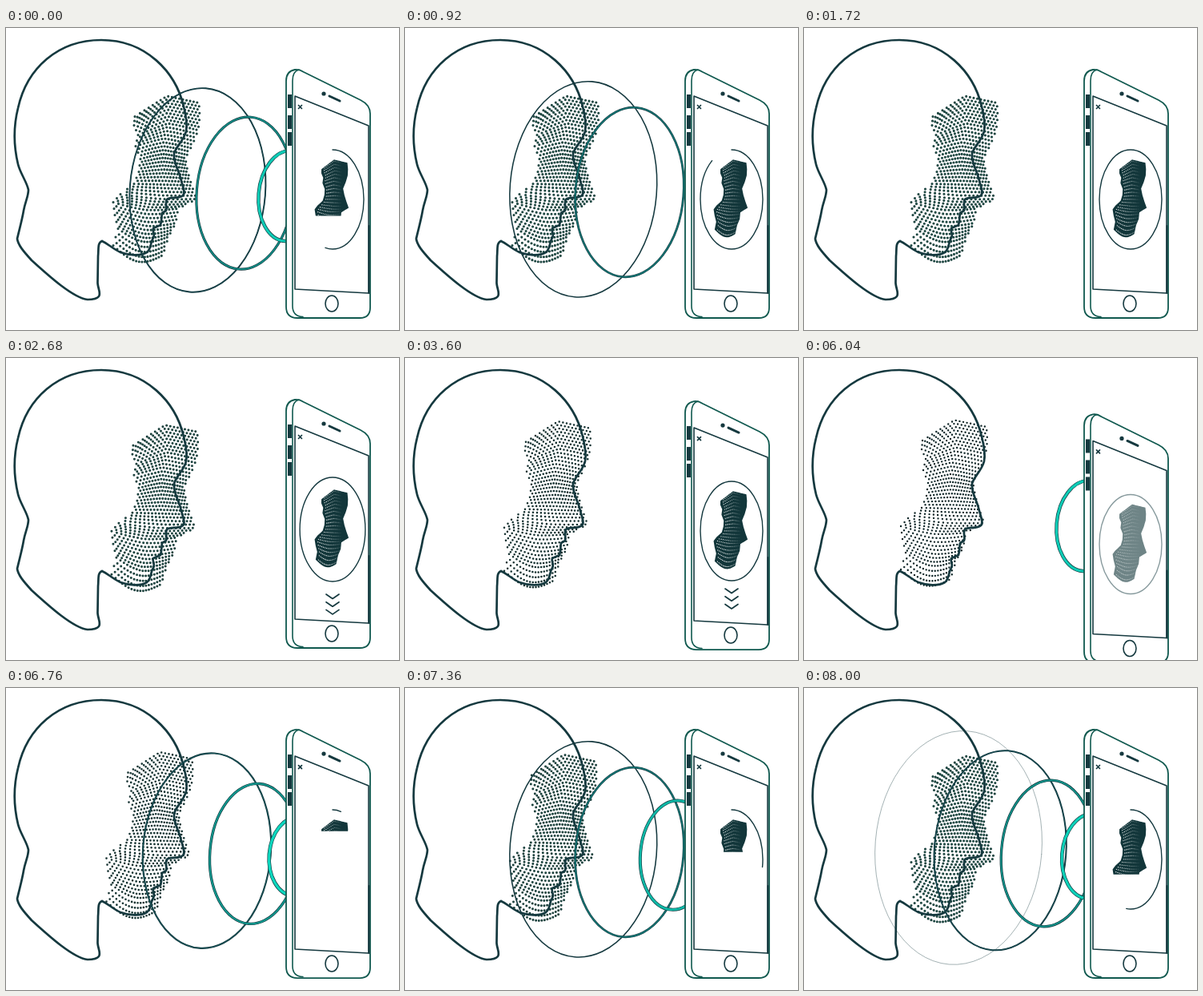
Recreate the animation shown at these times as an HTML page with a canvas. Size 491 by 377 pixels, loop 8040 ms.

```html
<!DOCTYPE html>
<html lang="en">
<head>
<meta charset="utf-8">
<title>Face scan</title>
<style>
html, body { margin: 0; width: 100%; height: 100%; overflow: hidden; background: #fff; }
canvas { display: block; }
</style>
</head>
<body>
<canvas id="stage" width="491" height="377"></canvas>
<script>
const LOOP = 8040;
const DARK = '#15393f', TEAL = '#10594f';
const ctx = document.getElementById('stage').getContext('2d');

const clamp = x => Math.max(0, Math.min(1, x));
const lerp = (a, b, k) => a + (b - a) * k;
const ease = (t, from, to) => (1 - Math.cos(Math.PI * clamp((t - from) / (to - from)))) / 2;
const mix = (a, b, k) => `rgb(${a.map((v, i) => Math.round(lerp(v, b[i], k)))})`;

function stroke(path, color, width) {
  ctx.strokeStyle = color;
  ctx.lineWidth = width;
  ctx.stroke(path);
}

function addDot(path, [x, y]) {
  path.moveTo(x, y);
  path.lineTo(x + .01, y);
}

const head = new Path2D(`M120 266 C114 268 116 276 115 285 L114.5 317 C114 323 119 331 116 335
  C113 339 107 339 102 339 C84 337 54 310 32 290 C22 279 15 271 14 263
  C17 250 20 240 22 228 C24 217 28 210 28 202 C26 192 18 182 15 170
  C9 145 10 120 15 100 C26 50 65 15 119 15 C175 15 212 55 222 98
  C225 110 227 120 225 129 C222 141 212 148 210 157 C209 168 215 176 218 187
  C220 196 225 206 221 209 C216 214 205 210 201 214 C198 219 202 224 200 228
  L195 231 C194 235 195 240 193 246 L184 250 C182 254 187 257 184 262
  C180 268 182 275 176 280 C168 285 154 284 143 280 C134 276 127 269 120 266`);

// Left and right edges of the face mesh, evenly spaced from brow to chin.
const LEFT = [[148,103],[147,114],[152,126],[149,140],[155,156],[153,172],
  [147,187],[130,200],[121,210],[123,226],[127,243],[121,264]];
const RIGHT = [[228,86],[229,103],[227,120],[220,138],[211,155],[214,172],
  [219,189],[225,206],[202,218],[199,236],[190,253],[183,276]];

function along(edge, v) {
  const p = v * (edge.length - 1), i = Math.min(edge.length - 2, Math.floor(p));
  return [0, 1].map(k => lerp(edge[i][k], edge[i + 1][k], p - i));
}

// Rows peak sharply at the forehead and sag smoothly at the chin.
function meshPoint(u, v) {
  const a = along(LEFT, v), b = along(RIGHT, v);
  const bend = lerp(1 - Math.abs(2 * u - 1), Math.sin(Math.PI * u), v);
  return [lerp(a[0], b[0], u), lerp(a[1], b[1], u) + lerp(-17, 14, v) * bend];
}

const toScreen = ([x, y]) => {
  const fy = (y - 77) / 211;
  return [387 + (x - 120) * .41 - 5 * (1 - fy), 164 + fy * 99];
};

const ROWS = 45, COLS = 17;
const cloud = new Path2D(), specks = new Path2D(), miniShape = new Path2D();
for (let r = 0; r < ROWS; r++)
  for (let c = 0; c < COLS; c++) {
    const u = (c + (r % 2) / 2) / (COLS - .5);
    const p = meshPoint(u ** .9, r / (ROWS - 1));
    addDot(cloud, p);
    if (c && r % 2) addDot(specks, toScreen(p));
  }

for (let i = 0; i <= 20; i++) miniShape.lineTo(...toScreen(meshPoint(i / 20, 0)));
for (let i = 0; i <= 44; i++) miniShape.lineTo(...toScreen(meshPoint(1, i / 44)));
for (let i = 20; i >= 0; i--) miniShape.lineTo(...toScreen(meshPoint(i / 20, 1)));
for (let i = 44; i >= 0; i--) miniShape.lineTo(...toScreen(meshPoint(0, i / 44)));

const gaps = ctx.createLinearGradient(388, 0, 420, 0);
gaps.addColorStop(0, '#fff');
gaps.addColorStop(.4, 'rgba(255,255,255,.8)');
gaps.addColorStop(1, 'rgba(255,255,255,0)');

const body = new Path2D('M350 66 Q350 54 361 52 Q366 51 372 55 L443 90 Q455 96 455 107 V349 Q455 362 442 362 H364 Q350 362 350 348Z');
const front = new Path2D('M366 52 Q358 54 358 66 V347 Q358 360 371 360.5');
const glass = new Path2D('M361 85 L453 122 V331 L361 326Z');
const details = new Path2D('M365.5 96.5 l4 4 m0 -4 l-4 4');

function drawWave(age) {
  const left = 209 - 182 * Math.sin(.00116 * (age - 700));
  const u = left - 213;
  const rx = 67.5 - .295 * u, ry = 106 - .41 * u - .0007 * u * u;
  const ring = new Path2D();
  ring.ellipse(left + rx, 205 + .045 * u, rx, ry, .08, 0, 7);
  const width = 4.9 - .0031 * age;
  ctx.globalAlpha = clamp((1360 - age) / 80);
  stroke(ring, DARK, width);
  if (width > 1.9)
    stroke(ring, mix([12, 228, 200], [22, 70, 79], clamp(age / 1000)), width - 1.3);
  ctx.globalAlpha = 1;
}

function drawMiniFace(limit, alpha) {
  ctx.save();
  ctx.globalAlpha = alpha;
  ctx.beginPath();
  ctx.rect(361, 150, 92, limit - 150);
  ctx.clip();
  ctx.fillStyle = '#12363a';
  ctx.fill(miniShape);
  stroke(specks, gaps, 1.3);
  ctx.restore();
}

function drawPhone(t, T) {
  ctx.save();
  ctx.translate(0, 34 * (ease(t, 3270, 5370) - ease(t, 5370, 6790)));
  ctx.fillStyle = '#fff';
  ctx.fill(body);
  stroke(body, TEAL, 1.8);
  stroke(front, TEAL, 1.6);
  stroke(glass, DARK, 1.6);
  stroke(details, DARK, 1.7);

  ctx.fillStyle = DARK;
  for (const y of [83, 109, 130]) ctx.fillRect(352, y, 5, 17);
  ctx.beginPath();
  ctx.arc(397, 82, 2.6, 0, 7);
  ctx.fill();
  stroke(new Path2D('M404 85 L417 91'), DARK, 3);
  stroke(new Path2D('M453.5 247 V331'), DARK, 2);
  const home = new Path2D();
  home.ellipse(407, 344, 8, 10, 0, 0, 7);
  stroke(home, DARK, 1.6);

  // Previous scan fades while the next one is drawn.
  const scanned = t >= 2500;
  if (scanned) drawMiniFace(270, 1 - clamp((t - 5600) / 1140));
  if (T > 6400) drawMiniFace(Math.min(270, 163 + (T - 6400) * .0435), 1);

  const grow = 1 + .05 * (ease(t, 1900, 2600) - ease(t, 2600, 3400));
  const oval = turn => {
    const p = new Path2D();
    p.ellipse(408, 214, 39 * grow, 62 * grow, 0, -Math.PI / 2, -Math.PI / 2 + turn * 2 * Math.PI);
    stroke(p, DARK, 1.4);
  };
  if (scanned && t < 6500) {
    ctx.globalAlpha = 1 - clamp((t - 5600) / 900);
    oval(1);
    ctx.globalAlpha = 1;
  }
  if (T > 6650) oval(clamp((T - 6650) * .139 / 360));

  const hint = Math.min(clamp((t - 2000) / 240), clamp((4150 - t) / 300));
  if (hint > 0) {
    ctx.globalAlpha = hint;
    const bob = 290.5 + 4.5 * Math.cos((t - 2680) / 920 * Math.PI);
    for (let i = 0; i < 3; i++)
      stroke(new Path2D(`M400 ${bob + i * 9.7} l8 5.5 l8 -5.5`), DARK, 1.7);
  }
  ctx.restore();
}

function draw(t) {
  const T = t < 2500 ? t + LOOP : t;
  ctx.fillStyle = '#fff';
  ctx.fillRect(0, 0, 491, 377);

  const away = 1 - ease(t, 2110, 4300) + ease(t, 5960, 7960);
  ctx.save();
  ctx.translate(13 * away, 7.5 * away);
  stroke(cloud, mix([18, 40, 42], [20, 56, 56], away), lerp(2.4, 3.1, away));
  stroke(cloud, mix([18, 40, 42], [52, 116, 88], away), 1.2);
  ctx.restore();

  stroke(head, DARK, 2.7);
  for (let n = 0; n < 7; n++) {
    const age = T - 5880 - n * 400;
    if (age > -70 && age < 1360) drawWave(age);
  }
  drawPhone(t, T);
}

ctx.lineJoin = ctx.lineCap = 'round';
const start = performance.now();
function tick() {
  draw((performance.now() - start) % LOOP);
  requestAnimationFrame(tick);
}
tick();
</script>
</body>
</html>
```
